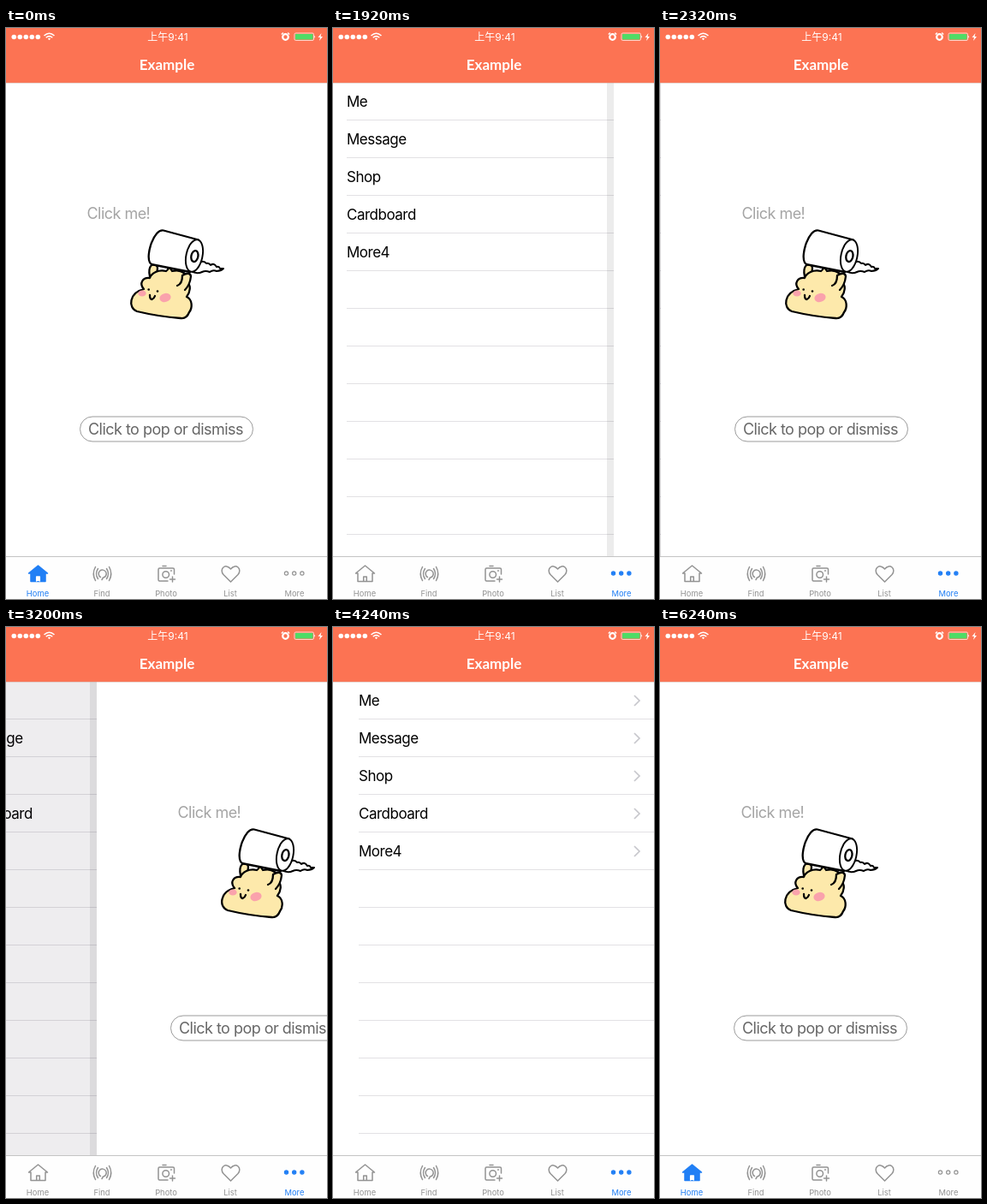
An HTML page that plays this animation: 375 by 667 pixels, repeating every 6.4 s.

```html
<!DOCTYPE html>
<html lang="en">
<head>
<meta charset="utf-8">
<title>Example</title>
<style>
  html, body { margin: 0; width: 100%; height: 100%; overflow: hidden; background: #fff; }
  svg { display: block; width: 375px; height: 667px; font-family: Inter, "Noto Sans CJK SC", "Noto Sans CJK", sans-serif; }
  .ink { stroke: #000; stroke-width: 2.3; stroke-linecap: round; stroke-linejoin: round; }
  .line { fill: none; }
  .cells text { font-size: 17px; letter-spacing: -.5px; }
  .page text { font-size: 18px; letter-spacing: -.53px; }
  .tab { --c: #939393; fill: none; stroke: var(--c); stroke-width: 1.5; stroke-linecap: round; stroke-linejoin: round; }
  .tab text { fill: var(--c); stroke: none; font-size: 9.4px; text-anchor: middle; }
  .tab.on { --c: #217ff5; }
  .tab.on .solid { fill: var(--c); }
  .tab.on .door { fill: #fff; stroke: #fff; }
</style>
</head>
<body>
<svg viewBox="0 0 375 667">
  <g id="list">
    <rect y="64" width="375" height="553" fill="#fff"/>
    <g id="cells" class="cells"></g>
  </g>
  <rect id="dim" y="64" width="375" height="553" fill="#201428" opacity=".075"/>

  <g id="page" class="page">
    <rect x="-8" y="64" width="8" height="553" opacity=".075"/>
    <rect y="64" width="375" height="553" fill="#fff"/>
    <text x="94.5" y="223" fill="#a5a5a5">Click me!</text>
    <g class="ink" fill="#fff">
      <path d="M228 273q4-1 6 2q3-1 5 2q4-3 7 2q3-1 4 2l4 0q-3 3-8 3q-4-2-8 1q-5-2-9 0q-6 3-13-1z" stroke-width="2"/>
      <path d="M168 290Q166 281 170 277Q176 275 177 280L176 290" fill="#fde9ab"/>
      <path d="M161 305C155 298 160 291 168 292C170 286 178 282 187 284Q189 283 190 280Q193 281 194 284C205 281 214 288 211 297C217 300 215 309 211 314C218 317 218 327 214 332Q211 340 204 339Q178 337 153 331C142 327 144 309 161 305Z" fill="#fde9ab"/>
      <path d="M200 301Q206 299 206 289Q215 284 216 290Q215 300 209 306" fill="#fde9ab"/>
      <path d="M184 236.500C173 234 163 265 168 274Q169 276 172 276.500L215 285L225 247.500Z"/>
      <ellipse cx="220" cy="266" rx="9.500" ry="19" transform="rotate(12 220 266)" stroke-width="1.900"/>
      <ellipse cx="220.500" cy="266.500" rx="4" ry="6.500" transform="rotate(12 220 266)"/>
    </g>
    <g fill="#faa2ac">
      <ellipse cx="159" cy="310" rx="4.700" ry="3.500"/>
      <ellipse cx="186" cy="315" rx="6.700" ry="5" transform="rotate(-15 186 315)"/>
    </g>
    <circle cx="166.700" cy="305.500" r="1.300"/>
    <circle cx="177" cy="307.500" r="1.300"/>
    <path class="ink line" d="M168 312q0 5 2.500 5q2.500-1 3.500-4" stroke-width="1.900"/>
    <rect x="86.500" y="454" width="202" height="29" rx="14.500" fill="none" stroke="#9b9b9b"/>
    <text x="96" y="474.500" fill="#666">Click to pop or dismiss</text>
  </g>

  <rect width="375" height="64" fill="#fc7353"/>
  <path d="M0 64.250H375" stroke="#c9a79d" stroke-width=".5"/>
  <g fill="#fff">
    <g id="signal"></g>
    <g fill="none" stroke="#fff" stroke-width="1.500">
      <path d="M44.500 9Q50.500 3.500 56.500 9M46.700 11.300Q50.500 8 54.300 11.300"/>
      <circle cx="326.500" cy="10.500" r="3.300" stroke-width="2.200"/>
      <path d="M321.800 7.500l2-2M331.200 7.500l-2-2" stroke-width="1.300"/>
      <rect x="337" y="6" width="22.500" height="8.500" rx="1.500" stroke-width=".7"/>
    </g>
    <path d="M48.800 12.500Q50.500 11 52.200 12.500L50.500 14.300ZM360.300 8.800q1.800 1.500 0 3ZM368.500 6l-4 5h2.500l-1 4l4-5h-2.500Z"/>
    <rect x="338" y="7" width="20.500" height="6.500" rx=".8" fill="#4fdc66"/>
    <text x="189" y="14.500" font-size="12" text-anchor="middle">上午9:41</text>
    <text x="188" y="48.500" font-size="17" font-weight="700" text-anchor="middle" font-family="Lato, sans-serif">Example</text>
  </g>

  <rect y="617" width="375" height="50" fill="#fefefe"/>
  <path d="M0 617.500H375" stroke="#c4c4c4"/>
  <g id="home" class="tab">
    <path class="solid" d="M26.500 637L37.500 628L48.500 637H46V646.500H29V637Z"/>
    <path class="door" d="M35.700 646V641H39.300V646"/>
    <text x="37" y="663.500">Home</text>
  </g>
  <g class="tab">
    <path d="M104.500 629.500Q100 637.500 104.500 645.500M120.500 629.500Q125 637.500 120.500 645.500M107.500 631.500Q103.500 637.500 107.500 643.500M117.500 631.500Q121.500 637.500 117.500 643.500M110.500 641.500A4.500 4.500 0 1 1 113.500 642L112 644.500"/>
    <text x="112" y="663.500">Find</text>
  </g>
  <g class="tab">
    <path d="M189 646H179.500Q178 646 178 644.500V632.500Q178 631 179.500 631H195Q196.500 631 196.500 632.500V638M183 628.500H187M194.500 641V647M191.500 644H197.500M192.500 634H193.500"/>
    <circle cx="186.700" cy="638.500" r="3.800"/>
    <text x="187" y="663.500">Photo</text>
  </g>
  <g class="tab">
    <path d="M262.500 647L254 638.500C248.500 632 256.500 624.500 262.500 632C268.500 624.500 276.500 632 271 638.500Z"/>
    <text x="262" y="663.500">List</text>
  </g>
  <g id="more" class="tab">
    <g class="solid" stroke-width="1.200">
      <circle cx="327.500" cy="637" r="2.100"/>
      <circle cx="336.700" cy="637" r="2.100"/>
      <circle cx="345.900" cy="637" r="2.100"/>
    </g>
    <text x="337" y="663.500">More</text>
  </g>
</svg>
<script>
const LOOP = 6400, STEP = 80, WIDTH = 375;
const el = id => document.getElementById(id);

const names = ["Me", "Message", "Shop", "Cardboard", "More4"];
for (let i = 0; i < 12; i++) {
  const y = 64 + i * 44;
  let row = `<path class="line" d="M30 ${y + 43.5}H375" stroke="#e2e1e4"/>`;
  if (names[i]) row += `<text x="30" y="${y + 28}">${names[i]}</text>
    <path class="line" d="M352 ${y + 16}l6 6l-6 6" stroke="#c7c7cc" stroke-width="1.7"/>`;
  el("cells").innerHTML += row;
}
for (let i = 0; i < 5; i++)
  el("signal").innerHTML += `<circle cx="${9.3 + i * 7}" cy="10.5" r="2.8"/>`;

// Left edge of the page over the list: [time, x]
const slide = [
  [1760, 375], [1840, 368], [1920, 328], [2000, 215], [2080, 106], [2160, 44], [2240, 13], [2320, 1], [2480, 0],
  [3000, 0], [3200, 106], [3440, 206], [3520, 278], [3600, 344], [3680, 375]
];

function pageX(t) {
  const i = slide.findIndex(k => k[0] > t);
  if (i < 0) return WIDTH;
  if (i === 0) return WIDTH;
  const [t0, x0] = slide[i - 1], [t1, x1] = slide[i];
  return x0 + (x1 - x0) * (t - t0) / (t1 - t0);
}

function draw(now) {
  const t = Math.floor(now % LOOP / STEP) * STEP;
  const more = t >= 1200 && t < 4400;
  const x = more ? Math.round(pageX(t)) : 0;
  el("page").setAttribute("transform", `translate(${x})`);
  el("page").style.display = x < WIDTH ? "" : "none";
  el("list").setAttribute("transform", `translate(${Math.round((x / WIDTH - 1) * 112)})`);
  el("dim").style.display = x < 150 ? "" : "none";
  el("more").classList.toggle("on", more);
  el("home").classList.toggle("on", !more);
}

const start = performance.now();
function tick() {
  draw(performance.now() - start);
  requestAnimationFrame(tick);
}
tick();
</script>
</body>
</html>
```
